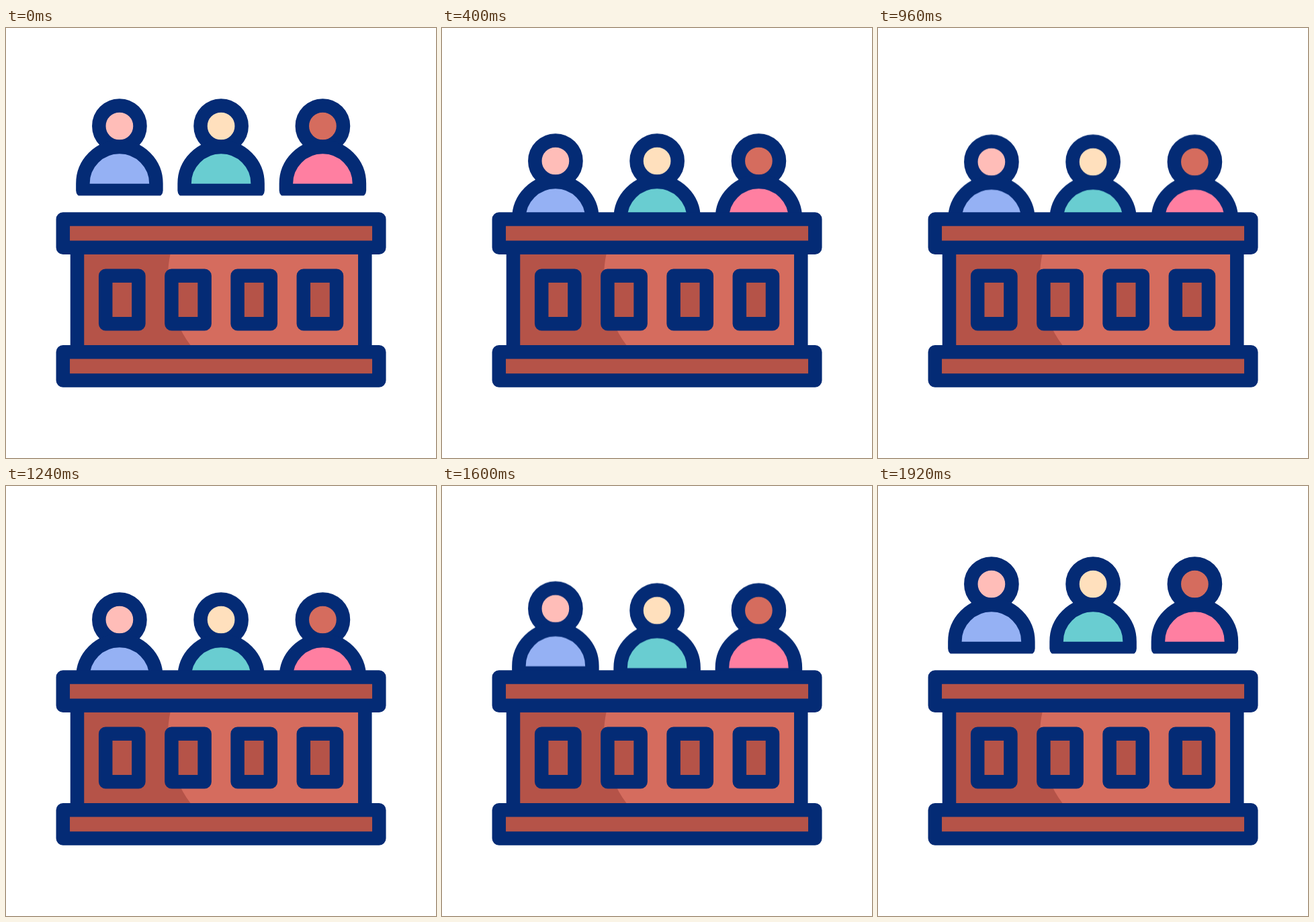
An HTML page that plays this animation: 640 px wide and 640 px high, repeating every 2000 ms.

```html
<!DOCTYPE html>
<html lang="en">
<head>
<meta charset="utf-8">
<title>Jury bench</title>
<style>
  html, body { margin: 0; width: 100%; height: 100%; overflow: hidden; background: #fff; }
  svg { display: block; width: 100vw; height: 100vh; }
  .line { stroke: #042b75; stroke-width: 20.5; stroke-linejoin: round; }
  .dark { fill: #b55348; }
  .light { fill: #d56c5e; }

  .juror { animation: 2s linear infinite; }
  .left { --skin: #ffbdb8; --shirt: #95b1f4; animation-name: sit-left; }
  .mid { --skin: #ffe0bd; --shirt: #69cdd1; animation-name: sit-mid; }
  .right { --skin: #d56c5e; --shirt: #ff7fa1; animation-name: sit-right; }

  /* trims the lower edge of a juror near the raised pose */
  .trim { fill: #fff; animation: trim 2s step-end infinite; }
  .left .trim { animation-name: trim-left; }

  /* quick staggered drop, slow drift, eased rise */
  @keyframes sit-left {
    0%, 2.6% { transform: translateY(0); }
    2.6%, 73.7% { animation-timing-function: cubic-bezier(.333, 0, .667, 1); }
    12.6% { transform: translateY(51.5px); }
    52% { transform: translateY(53.5px); }
    73.7% { transform: translateY(52.4px); }
    94.7%, 100% { transform: translateY(0); }
  }
  @keyframes sit-mid {
    0%, 5.45% { transform: translateY(0); }
    5.45%, 74.8% { animation-timing-function: cubic-bezier(.333, 0, .667, 1); }
    15.45% { transform: translateY(51.6px); }
    52% { transform: translateY(53.5px); }
    74.8% { transform: translateY(52.4px); }
    95.8%, 100% { transform: translateY(0); }
  }
  @keyframes sit-right {
    0%, 7.3% { transform: translateY(0); }
    7.3%, 74.8% { animation-timing-function: cubic-bezier(.333, 0, .667, 1); }
    17.3% { transform: translateY(51.7px); }
    52% { transform: translateY(53.5px); }
    74.8% { transform: translateY(52.4px); }
    95.8%, 100% { transform: translateY(0); }
  }
  @keyframes trim {
    0% { opacity: 1; }
    4% { opacity: 0; }
    85% { opacity: 1; }
    100% { opacity: 1; }
  }
  @keyframes trim-left {
    0% { opacity: 1; }
    4% { opacity: 0; }
    88% { opacity: 1; }
    100% { opacity: 1; }
  }
</style>
</head>
<body>
<svg viewBox="0 0 640 640">
  <defs>
    <g id="person" class="line">
      <circle cy="146" r="30.6" style="fill:var(--skin)"/>
      <path d="M-54.5 242V231.6a54.5 54.5 0 0 1 109 0V242Z" style="fill:var(--shirt)"/>
    </g>
    <rect id="edge" x="-68" y="249.5" width="136" height="4"/>
    <rect id="pane" class="line dark" x="148.2" y="368.8" width="49.2" height="71.4"/>
    <rect id="rail" class="line dark" x="84.8" width="470.5" height="42.3"/>
  </defs>

  <g class="juror left">
    <use href="#person" x="168.9"/>
    <use href="#edge" x="168.9" class="trim"/>
  </g>
  <g class="juror mid">
    <use href="#person" x="320.1"/>
    <use href="#edge" x="320.1" class="trim"/>
  </g>
  <g class="juror right">
    <use href="#person" x="471.4"/>
    <use href="#edge" x="471.4" class="trim"/>
  </g>

  <rect class="light" x="106" y="327" width="428.3" height="155"/>
  <path class="dark" d="M106 337H244.5C236 375 242 428 274.5 472V482H106Z"/>
  <path class="line" fill="none" d="M106 327V482M534.3 327V482"/>
  <use href="#pane"/>
  <use href="#pane" x="98.2"/>
  <use href="#pane" x="196.4"/>
  <use href="#pane" x="294.6"/>
  <use href="#rail" y="284.5"/>
  <use href="#rail" y="482.3"/>
</svg>
</body>
</html>
```
